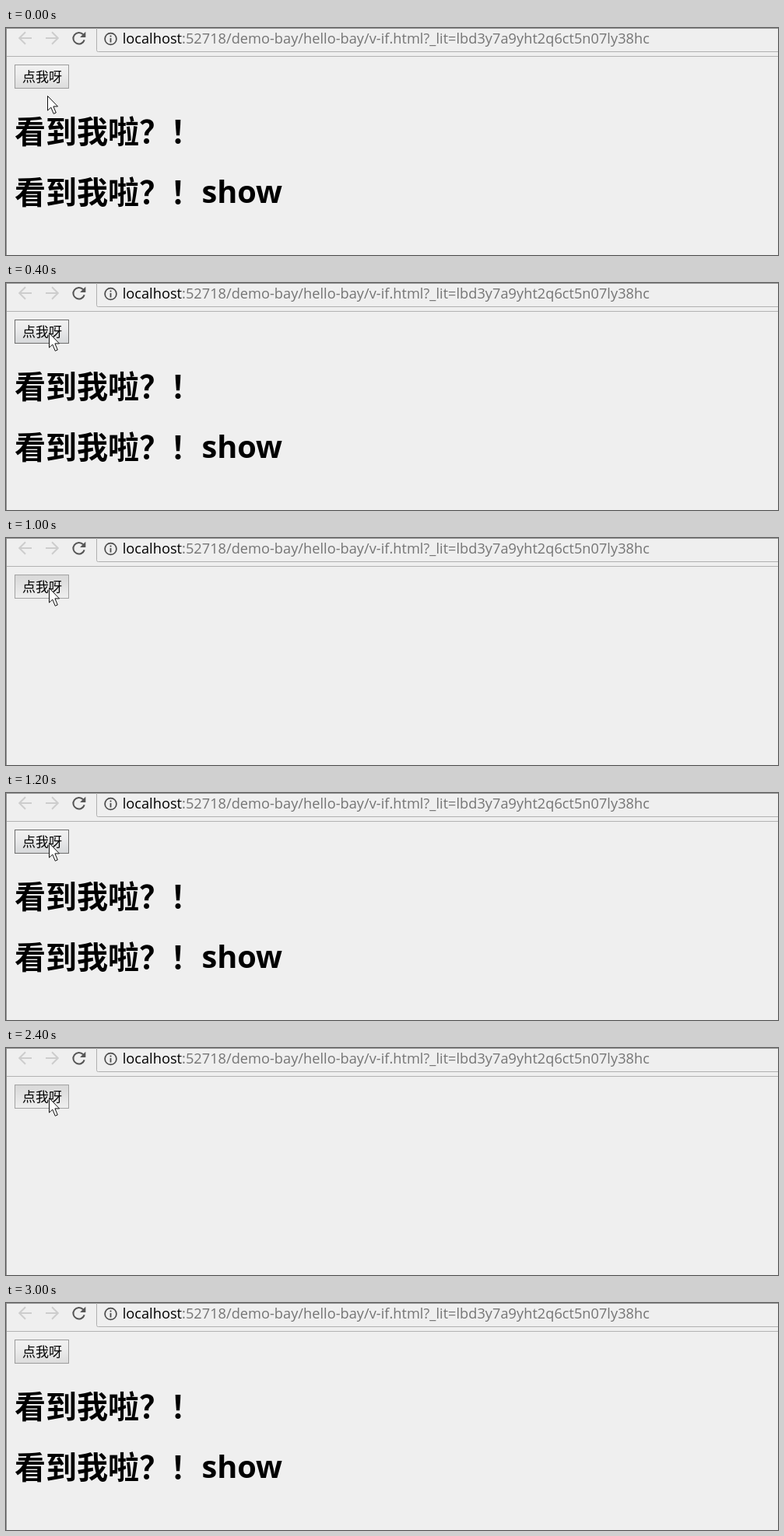
Recreate the animation shown at these times as an HTML page. Size 992 px wide and 292 px high, loop 3400 ms.

```html
<!DOCTYPE html>
<html lang="zh-CN">
<head>
<meta charset="utf-8">
<title>Toggle demo</title>
<style>
  html, body { margin: 0; width: 100%; height: 100%; overflow: hidden; background: #efefef; }
  svg { display: block; }
  text { font-family: "Open Sans", "Noto Sans CJK SC", "Noto Sans CJK", sans-serif; white-space: pre; }
  .cjk { font-family: "Noto Sans CJK SC", "Noto Sans CJK", sans-serif; }
  .head { font-size: 40px; font-weight: 700; }
  .line { fill: none; stroke-width: 1; shape-rendering: crispEdges; }
  .nav { fill: none; stroke: #cdcdcd; stroke-width: 2; }
</style>
</head>
<body>
<svg width="992" height="292" viewBox="0 0 992 292">
  <defs>
    <linearGradient id="raised" x2="0" y2="1">
      <stop offset="0" stop-color="#f1f1f1"/>
      <stop offset=".38" stop-color="#ededed"/>
      <stop offset="1" stop-color="#dcdcdc"/>
    </linearGradient>
    <linearGradient id="lit" x2="0" y2="1">
      <stop offset="0" stop-color="#f1f1f1"/>
      <stop offset=".38" stop-color="#ebebec"/>
      <stop offset="1" stop-color="#d6d8da"/>
    </linearGradient>
    <linearGradient id="sunk" x2="0" y2="1">
      <stop offset="0" stop-color="#d8d8d8"/>
      <stop offset="1" stop-color="#efefef"/>
    </linearGradient>
  </defs>

  <rect width="992" height="292" fill="#efefef"/>

  <!-- browser bar -->
  <path class="line" d="M0 .5H992" stroke="#919191"/>
  <path class="line" d="M.5 0V292" stroke="#8e8e8e"/>
  <path class="line" d="M1 36.5H992" stroke="#b2b2b2"/>
  <path d="M116.5 0V28.5Q116.5 30.5 118.5 30.5H992" fill="none" stroke="#b0b0b0"/>
  <path class="nav" d="M33 13H17.5M25 5.2L17.2 13L25 20.8"/>
  <path class="nav" d="M51 13H66.5M59 5.2L66.8 13L59 20.8"/>
  <path d="M99.1 8.3A7.3 7.3 0 1 0 100.7 15.4" fill="none" stroke="#555" stroke-width="2"/>
  <path d="M102.3 4.8V12H95.1Z" fill="#555"/>
  <circle cx="134.5" cy="14" r="7.4" fill="none" stroke="#4c4c4c" stroke-width="1.7"/>
  <path d="M134.5 9.6V11.5M134.5 13V18.4" stroke="#4c4c4c" stroke-width="1.8"/>
  <text x="149.7" y="20" font-size="18.23" fill="#757575"><tspan fill="#000">localhost</tspan>:52718/demo-bay/hello-bay/v-if.html?_lit=lbd3y7a9yht2q6ct5n07ly38hc</text>

  <!-- page -->
  <rect id="button" x="11.5" y="47.5" width="69" height="30" shape-rendering="crispEdges"/>
  <text class="cjk" x="21" y="69" font-size="17">点我呀</text>
  <g id="heads">
    <text class="cjk head" x="11" y="147.5">看到我啦？！</text>
    <text class="cjk head" x="11" y="225.5">看到我啦？！</text>
    <text class="head" x="251.5" y="225" style="font-size:39.7px">show</text>
  </g>
  <path id="cursor" d="M0 0V18.6L4.3 14.6L7.7 22.8L10.8 21.5L7.4 13.4H13Z" fill="#fff" stroke="#111" stroke-linejoin="round"/>
</svg>
<script>
const LOOP = 3400;
const $ = id => document.getElementById(id);
const button = $("button"), heads = $("heads"), cursor = $("cursor");

const looks = {
  idle: ["url(#raised)", "#9c9c9c"],
  hover: ["url(#lit)", "#6e6e6e"],
  down: ["url(#sunk)", "#a2a2a2"]
};

// Each track lists [start ms, value]; values hold until the next start.
const buttonTrack = [
  [0, "idle"], [200, "hover"], [1000, "down"], [1200, "hover"],
  [2400, "down"], [2600, "hover"], [2800, "idle"]
];
const headTrack = [[0, true], [600, false], [1200, true], [1800, false], [2600, true]];
const cursorTrack = [
  [0, [53.5, 87.5]], [200, [48.5, 70.5]], [400, [55.5, 64.5]],
  [2800, [39.5, 0.5]], [3000, null]
];

function valueAt(track, t) {
  let value = track[0][1];
  for (const [start, next] of track) if (t >= start) value = next;
  return value;
}

function draw(t) {
  const [fill, edge] = looks[valueAt(buttonTrack, t)];
  button.setAttribute("fill", fill);
  button.setAttribute("stroke", edge);
  heads.setAttribute("visibility", valueAt(headTrack, t) ? "visible" : "hidden");
  const spot = valueAt(cursorTrack, t);
  cursor.setAttribute("visibility", spot ? "visible" : "hidden");
  if (spot) cursor.setAttribute("transform", `translate(${spot})`);
}

const begin = performance.now();
function tick() {
  draw((performance.now() - begin) % LOOP);
  requestAnimationFrame(tick);
}
tick();
</script>
</body>
</html>
```
